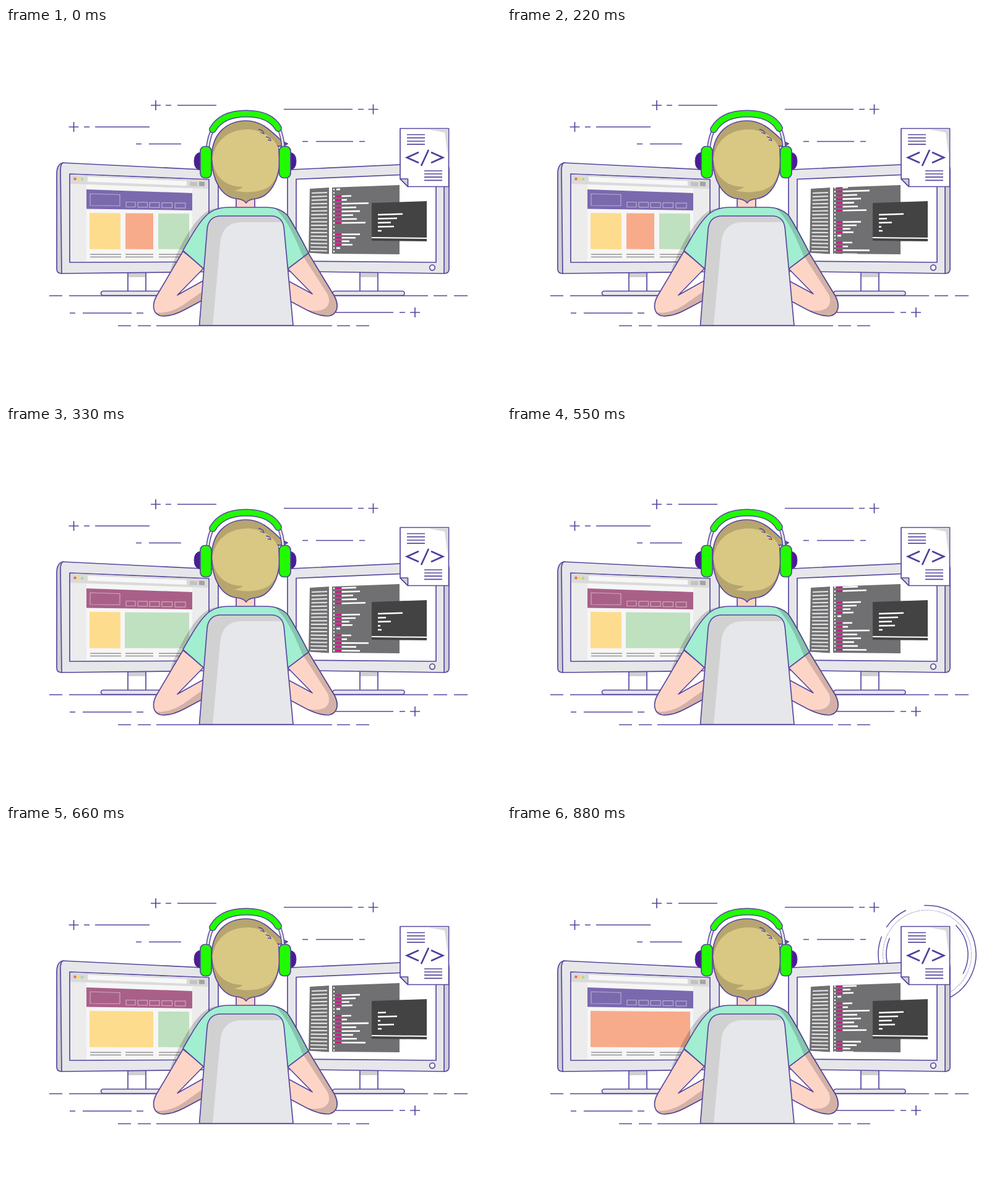
Recreate the animation shown at these times as an HTML page. Size 800 by 600 pixels, loop 0.99 s.

```html
<!DOCTYPE html>
<html lang="en">
<head>
<meta charset="utf-8">
<title>Coder at two screens</title>
<style>
  html, body { margin: 0; width: 100%; height: 100%; overflow: hidden; background: #fff; }
  svg { display: block; width: 800px; height: 600px; }
  .line { fill: none; stroke: #58479f; stroke-width: 1.7; }
  .ink { stroke: #58479f; stroke-width: 1.7; stroke-linejoin: round; }
  .body { fill: #e6e7ea; }
  .skin { fill: #fdd5c7; }
  .shade { fill: #000; fill-opacity: .17; }
  .cup { fill: #21fb00; }
  .wire { stroke-width: 6; }
  .wire.core { stroke: #e6e7ea; stroke-width: 3; }
  .band { stroke-width: 12; stroke-linecap: round; }
  .band.core { stroke: #21fb00; stroke-width: 9; }
</style>
</head>
<body>
<svg viewBox="0 0 800 600">
  <defs>
    <clipPath id="codeClip"><path d="M527 258 636 254V366L527 365Z"/></clipPath>
  </defs>

  <path id="dashes" class="line"/>

  <g id="rings" fill="none" stroke="#58479f" stroke-linecap="round">
    <path id="arcs" stroke-width="1.5"/>
    <path id="dots" stroke-width="1.1" stroke-dasharray=".1 2.5"/>
  </g>

  <!-- Left monitor -->
  <path class="ink" fill="#fff" d="M197 390H226V426H197Z"/>
  <path fill="#cfcfd1" d="M198 396H225V403H198Z"/>
  <rect class="ink body" x="153.500" y="425.500" width="116" height="7" rx="3.500"/>
  <path class="ink" fill="#d0d0d4" d="M92 218Q82 220 82 236V390Q82 397 90 397L100 390V225Z"/>
  <path class="ink body" d="M92 218 338 230Q343 230.500 343 238V394L90 397L88 230Q88 220 92 218Z"/>
  <path class="ink" fill="#fff" d="M103 236 328 245V378L103 379Z"/>
  <path fill="#ececed" d="M104 250 327 259V377L104 378Z"/>
  <path fill="#f6f6f6" d="M130 252 301 259V377L130 378Z"/>
  <path fill="#dadadb" d="M104 237 327 246V260L104 252Z"/>
  <path fill="#f7f7f7" d="M132 240.500 292 247.500V255L132 248.500Z"/>
  <path fill="#c2c2c3" d="M297 249 309 249.500V256L297 255.500Z"/>
  <path fill="#a3a3a4" d="M312 248.500 321 249V256L312 255.500Z"/>
  <circle cx="111.500" cy="244" r="2.300" fill="#ed6a6a"/>
  <circle cx="117.200" cy="244.200" r="2.300" fill="#f7e04b"/>
  <circle cx="123" cy="244.500" r="2.300" fill="#b5d58c"/>
  <path id="banner" d="M130 261 301 267V295L130 292.500Z"/>
  <path id="nav" fill="none" stroke="#fff" stroke-opacity=".45" stroke-width="1.200"/>
  <g id="cards"></g>
  <path stroke="#a0a0a0" stroke-width="1.800" d="M136 366.200H186M136 370.300H186M193 366.200H238M193 370.300H238M247 366.200H297M247 370.300H297"/>

  <!-- Right monitor -->
  <path class="ink" fill="#fff" d="M572 390H601V426H572Z"/>
  <path fill="#cfcfd1" d="M573 396H600V403H573Z"/>
  <rect class="ink body" x="528" y="425.500" width="116" height="7" rx="3.500"/>
  <path class="ink" fill="#d0d0d4" d="M700 218H710Q716 220 716 230V390Q716 397 708 397L698 390Z"/>
  <path class="ink body" d="M461 229 703 218Q708 218 708 225V397L455 393.500V236Q455 229 461 229Z"/>
  <path class="ink" fill="#fff" d="M469 244.500 695 235V379L469 377Z"/>
  <circle class="ink" fill="#fff" cx="689" cy="387.500" r="4.300"/>
  <path fill="#707072" d="M491 260 522 258V365.500L489 363.500Z"/>
  <path id="files" stroke="#e2e2e2" stroke-width="2.200"/>
  <path fill="#707072" d="M527 258 636 254V366L527 365Z"/>
  <g id="code" clip-path="url(#codeClip)" stroke-width="2.600"></g>
  <path fill="#434343" d="M591 283 680 280V345L591 344Z"/>
  <path stroke="#fff" stroke-width="2" d="M591 339 680 340"/>
  <path id="terminal" stroke="#fff" stroke-width="2.500"/>

  <!-- Document -->
  <path class="ink" fill="#fff" d="M637 162.500H715.500V256.500H649.500L637 244Z"/>
  <path fill="#d9d9dc" d="M680 163.500H714.700V212L709 169Z"/>
  <path class="ink" fill="#d0d0d4" d="M637 244H649.500V256.500Z"/>
  <path class="line" d="M648 172.500H677M648 177.700H677M648 183H677M648 188.200H677M676 231H705M676 236H705M676 241.200H705M676 246.300H705"/>
  <path fill="none" stroke="#503f9c" stroke-width="2.700" d="M667 201 648 209.500 667 218M683 197 671 223M687 201 706 209.500 687 218"/>

  <!-- Person -->
  <path class="shade" d="M265 394C280 350 302 316 318 302Q330 291 350 290L325 303C312 315 300 335 286 361Z"/>
  <path class="ink skin" d="M372 268H402V296H372Z"/>
  <path class="ink skin" d="M286 361 243 434C235 449 238 463 250 465.500C262 467 275 463 288 456L320 439V408L277 432 320 388Z"/>
  <path class="shade" d="M241 460C257 462 272 457 286 448L320 424V439L288 456C270 466 250 469 241 460Z"/>
  <path class="ink skin" d="M488 363 531 434C539 450 535 463 523 465.500C511 467 498 462 486 456L456 440V409L495 430 454 388Z"/>
  <path class="shade" d="M488 363 531 434C539 450 535 463 523 465.500C510 467 498 462 486 456C512 461 528 452 520 431L480 369Z"/>
  <path class="ink" fill="#a1eed0" d="M286 360C300 335 312 314 325 302Q338 290 360 290H420Q442 290 455 303C467 321 478 343 489 364L456 389H319Z"/>
  <path class="shade" d="M434 291Q448 294 456 304C468 322 478 343 489 364L480 370C469 344 457 312 434 291Z"/>

  <path class="ink" fill="#b6a56e" d="M332.500 210C332 171 357 150 388 150C411 150 425 163 444 181Q449 187 455 187L440 192L442 215C442 248 425 273 404 276Q392 277 388 283Q384 277 372 276C349 273 333 248 332.500 210Z"/>
  <path fill="#d8c883" d="M333.500 212C337 185 356 164 392 164C415 165 432 177 440 193L441 215C441 233 435 248 427 255C412 267 388 267 369 263Q378 261 383 257C359 257 337 245 333.500 212Z"/>
  <path fill="none" stroke="#58479f" stroke-width="1.300" d="M408 164Q416 165 417 171L411 169M420 176Q428 177 428 182L423 181M438 190 447 193M444 181 455 187 449 192"/>

  <path class="line wire" d="M326 194Q328 174 336 160M448 194Q447 175 440 160"/>
  <path class="line wire core" d="M326 194Q328 174 336 160M448 194Q447 175 440 160"/>
  <path class="line band" d="M334 164C345 145 366 138.500 388 138.500C412 138.500 431 146 440 162"/>
  <path class="line band core" d="M334 164C345 145 366 138.500 388 138.500C412 138.500 431 146 440 162"/>
  <path fill="#4b1d92" stroke="#503f9c" d="M315 201Q304 202 304 215.500T315 230ZM458 201Q469 202 469 215.500T458 230Z"/>
  <rect class="ink cup" x="314" y="191.500" width="18" height="51" rx="7.500"/>
  <rect class="ink cup" x="441.500" y="191.500" width="18.500" height="51" rx="7.500"/>

  <path class="body" d="M312.500 481 325 326Q327 304 348 304H428Q448 304 449.500 326L464 481Z"/>
  <path fill="#d1d1d2" d="M312.500 481 325 326Q327 304 348 304H428Q440 304 446 314H382Q348 314 346 350L334 481Z"/>
  <path class="line" d="M312.500 481 325 326Q327 304 348 304H428Q448 304 449.500 326L464 481Z"/>
</svg>
<script>
const STEP = 110, STEPS = 9;
const el = id => document.getElementById(id);
const setPath = (id, d) => el(id).setAttribute('d', d);

// Background rows: y followed by start,end pairs.
const dashRows = [
  [160, 126, 135, 144, 232], [125, 258, 267, 277, 340], [187.5, 210, 219, 231, 283],
  [131.5, 449, 560, 569, 578], [183.5, 479, 488, 501, 561, 571, 580],
  [433, 70, 91, 102, 682, 691, 713, 724, 746], [461, 103, 112, 124, 203, 211, 222],
  [460, 533, 626, 636, 645], [481.5, 181, 202, 213, 234, 243, 527, 535, 556, 566, 587]
];
const pluses = [[109.5, 160], [242, 125], [593.5, 131.5], [661, 460]];
let dashes = '';
for (const [y, ...x] of dashRows)
  for (let i = 0; i < x.length; i += 2) dashes += `M${x[i]} ${y}H${x[i + 1]}`;
for (const [x, y] of pluses) dashes += `M${x - 8} ${y}h16m-8-8v16`;
setPath('dashes', dashes);

// Clockwise arc around the document, angles in degrees from the right.
function arc(r, from, to) {
  const point = deg => {
    const a = deg * Math.PI / 180;
    return `${679 + r * Math.cos(a)} ${207.5 + r * Math.sin(a)}`;
  };
  return `M${point(from)}A${r} ${r} 0 ${+(to - from > 180)} 1 ${point(to)}`;
}
setPath('arcs', arc(79, 169, 201) + arc(79, 214, 244) + arc(79, -93, 62) + arc(66, 168, 203) + arc(66, -45, 28));
setPath('dots', arc(71.5, 168, 420));

setPath('nav', 'M136 268 184 269.500V287.500L136 287Z' +
  [194, 213, 232, 252, 273].map((x, i) => `M${x} ${281.5 + i * .4}h${15 + i * .5}v8h-${15 + i * .5}Z`).join(''));

setPath('files', Array.from({length: 17}, (_, i) => {
  const y = 267 + i * 5.8;
  return `M${494 - i * .12} ${y}L519 ${y - .9 + i * .1}`;
}).join(''));

// Right ends of the code lines; 0 is an empty line. The second block is set tighter.
const codeEnds = [558, 551, 586, 566, 572, 561, 567, 581, 0, 0, 572, 565, 555, 560, 540, 0];
const PERIOD = 95;
const rowOffset = i => i < 10 ? i * 6.18 : 61.8 + (i - 10) * 5.53;

function codeRow(y, end) {
  const slope = -.035 + (y - 258) * .0004;
  const bar = (x1, x2, color) =>
    `<path stroke="${color}" d="M${x1} ${y + (x1 - 540) * slope}L${x2} ${y + (x2 - 540) * slope}"/>`;
  let row = bar(529, 531, '#fff');
  if (end === 540) row += bar(534, 540, '#fff');
  else if (end) row += bar(533, 542, '#d9128c') + bar(542.5, end, '#fff');
  return row;
}

function drawCode(step) {
  let rows = '';
  for (let block = -1; block < 3; block++)
    codeEnds.forEach((end, i) => {
      const y = 272 - step * 10 + block * PERIOD + rowOffset(i);
      if (y > 254 && y < 368) rows += codeRow(y, end);
    });
  el('code').innerHTML = rows;
}

const YELLOW = '#fddc8d', ORANGE = '#f8ab8b', GREEN = '#bfe1c0';
const layouts = {
  three: [[135, 185, YELLOW], [193, 238, ORANGE], [246, 296, GREEN]],
  wideRight: [[135, 185, YELLOW], [192, 296, GREEN]],
  wideLeft: [[135, 238, YELLOW], [246, 296, GREEN]],
  single: [[135, 296, ORANGE]]
};
const layoutAt = step => step < 3 ? 'three' : step < 6 ? 'wideRight' : step < 7 ? 'wideLeft' : 'single';

function drawPage(step) {
  const top = x => 299 + (x - 135) * .008;
  el('cards').innerHTML = layouts[layoutAt(step)].map(([a, b, color]) =>
    `<path fill="${color}" d="M${a} ${top(a)}L${b} ${top(b)}V358L${a} 357.500Z"/>`).join('');
  el('banner').setAttribute('fill', step > 2 && step < 7 ? '#a96088' : '#7b69ae');
}

const outputs = {
  full: [641, 632, 622, 627, 607],
  short: [641, 614, 622, 605, 607],
  broken: [614, 632, 605, 627, 607]
};
const outputAt = step => step === 2 || step === 3 ? 'short' : step === 6 || step === 7 ? 'broken' : 'full';

function drawTerminal(step) {
  setPath('terminal', outputs[outputAt(step)].map((end, i) => {
    const y = 302 + i * 6.5;
    return `M601 ${y}L${end} ${y - (end - 601) * (.03 - i * .005)}`;
  }).join(''));
}

let shown = -1;
function frame(now) {
  const step = Math.floor(now / STEP) % STEPS;
  if (step !== shown) {
    shown = step;
    drawCode(step);
    drawPage(step);
    drawTerminal(step);
    el('rings').style.display = step === 8 ? '' : 'none';
  }
  requestAnimationFrame(frame);
}
frame(0);
</script>
</body>
</html>
```
